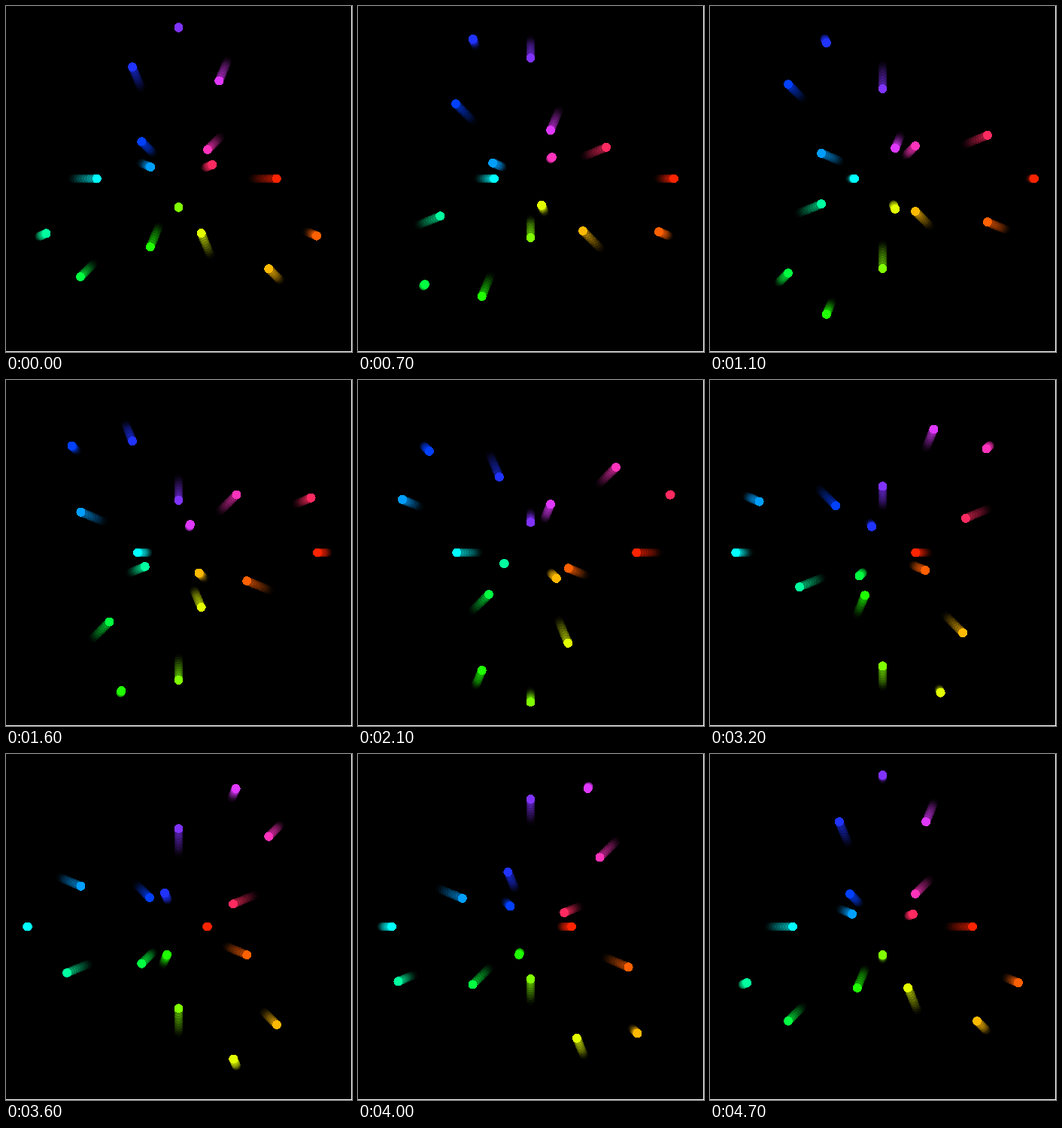
Write an HTML page with a canvas that moves like this. It is 460 px wide and 460 px high and loops after 4800 ms.

```html
<!DOCTYPE html>
<html lang="en">
<head>
<meta charset="utf-8">
<title>Radial dots</title>
<style>
  html, body { margin: 0; width: 100%; height: 100%; overflow: hidden; background: #fff; }
  canvas { display: block; }
</style>
</head>
<body>
<canvas id="stage" width="459" height="459"></canvas>
<script>
const ctx = document.getElementById('stage').getContext('2d');
const COLORS = [
  '#ff2400', '#ff6000', '#ffba00', '#e2ff00', '#80ff00', '#20ff00', '#00ff40', '#00ff9f',
  '#00ffff', '#009fff', '#0040ff', '#2033ff', '#8033ff', '#df38ff', '#ff33bb', '#ff2a60'
];
const STEPS = 48, STEP_MS = 100;
const SIZE = 459, CENTER = SIZE / 2, MID = 119.5, SWING = 82, RADIUS = 6;
const GHOSTS = 9, LAG = 2.5;
const rad = deg => deg * Math.PI / 180;

// Hard-edged disc: fills every pixel whose centre lies inside
function disc(cx, cy) {
  const edge = v => Math.ceil(v - 0.5);
  for (let y = edge(cy - RADIUS); y < edge(cy + RADIUS); y++) {
    const half = Math.sqrt(RADIUS ** 2 - (y + 0.5 - cy) ** 2);
    const left = edge(cx - half);
    ctx.fillRect(left, y, edge(cx + half) - left, 1);
  }
}

function dot(i, phase, alpha) {
  const angle = rad(i * 22.5);
  const r = MID + SWING * Math.sin(rad(phase + i * 67.5));
  ctx.globalAlpha = alpha;
  ctx.fillStyle = COLORS[i];
  disc(CENTER + r * Math.cos(angle), CENTER + r * Math.sin(angle));
}

function draw(time) {
  const step = Math.floor(time / STEP_MS) % STEPS;
  const phase = (step + 1) * 360 / STEPS;
  ctx.globalAlpha = 1;
  ctx.fillStyle = '#000';
  ctx.fillRect(0, 0, SIZE, SIZE);
  COLORS.forEach((_, i) => {
    // Trail from the faintest ghost up to the solid head
    for (let k = GHOSTS; k > 0; k--) dot(i, phase - k * LAG, 0.3 * (1 - k / (GHOSTS + 1)));
    dot(i, phase, 1);
  });
}

const start = performance.now();
function tick() {
  draw(performance.now() - start);
  requestAnimationFrame(tick);
}
tick();
</script>
</body>
</html>
```
